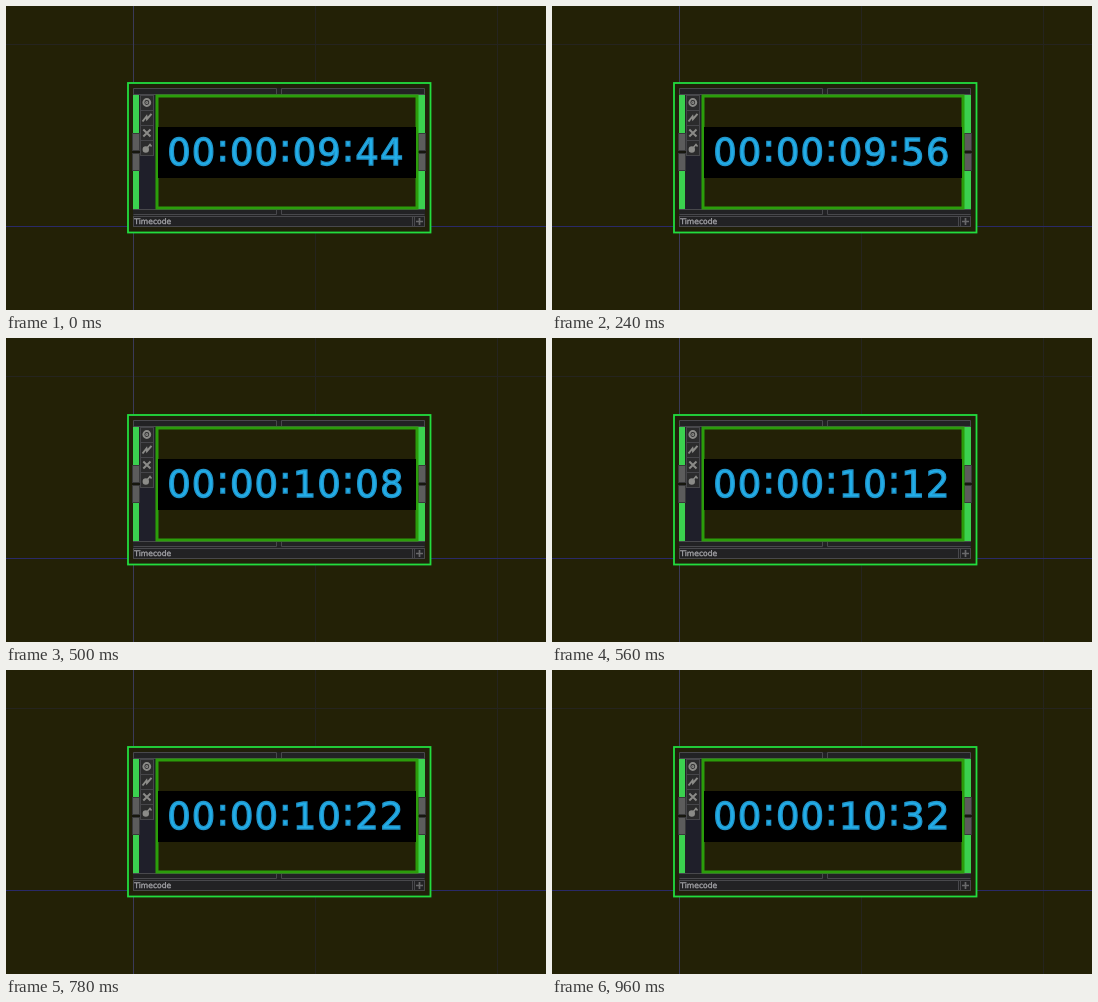
Recreate the animation shown at these times as an HTML page. Size 540 by 304 pixels, loop 980 ms.

```html
<!DOCTYPE html>
<html lang="en">
<head>
<meta charset="utf-8">
<title>Timecode</title>
<style>
  html, body { margin: 0; width: 100%; height: 100%; overflow: hidden; background: #232106; }
  svg { display: block; width: 540px; height: 304px; }
  text { font-family: "DejaVu Sans", sans-serif; }
  .digits { font-size: 37px; letter-spacing: 1.05px; fill: #22aee8; stroke: #2094ca; stroke-width: 1.3; }
  .label { font-size: 7.6px; fill: #a2a2a6; stroke: #a2a2a6; stroke-width: .35; }
  .edge { fill: none; stroke: #48484c; }
  .icon { fill: none; stroke: #8b8b88; stroke-width: 2; }
</style>
</head>
<body>
<svg viewBox="0 0 540 304">
  <rect width="540" height="304" fill="#232106"/>

  <!-- grid -->
  <path d="M0 38.5H540M309.5 0V304M491.5 0V304" stroke="#25241f" fill="none"/>
  <path d="M127.5 0V304" stroke="#3a3a58" fill="none"/>
  <path d="M0 220.5H540" stroke="#2a2a68" fill="none"/>

  <!-- node body -->
  <rect x="122" y="77" width="302.5" height="149.5" fill="#21200a" stroke="#22dc3e" stroke-width="1.8"/>
  <rect x="127" y="82" width="292" height="139" fill="#222224"/>
  <g class="edge">
    <path d="M127.5 88V82.5H270.5V88M275.5 88V82.5H418.5V88M127 88.5H419"/>
    <path d="M127 203.5H419M270.5 204V208.5H127.5M275.5 204V208.5H418.5"/>
    <rect x="127.5" y="210.5" width="291" height="10"/>
    <path d="M406.5 210V221M408.5 210V221"/>
  </g>

  <!-- side bars and connectors -->
  <path d="M127 89h6v114h-6zM412 89h7v114h-7z" fill="#3bd14f"/>
  <path d="M126 127h8v38h-8zM412 127h8v38h-8z" fill="#17170f"/>
  <g id="plugs" fill="#5c5c5c" stroke="#38383a"></g>

  <!-- flag column -->
  <rect x="134" y="89" width="15" height="114" fill="#1f1f2a"/>
  <g id="cells" fill="#2b2b2c" stroke="#46464a"></g>
  <g class="icon">
    <circle cx="140.8" cy="96.5" r="3.4"/>
    <circle cx="140.8" cy="96.5" r=".6"/>
    <path d="M136.5 115.5L140.5 110.5L141 113L145.5 107.8"/>
    <path d="M137.3 123.5L144.5 130.5M144.5 123.5L137.3 130.5"/>
    <circle cx="139.8" cy="143.5" r="2.2" fill="#8b8b88"/>
    <path d="M141 142L144 138.5L145.5 140.5" stroke-width="1.5"/>
  </g>

  <!-- viewer -->
  <rect x="151" y="90" width="260" height="112" fill="#232106" stroke="#2b9d0b" stroke-width="3"/>
  <rect x="152" y="121" width="258" height="51" fill="#000"/>
  <text class="digits" x="161.2" y="159.2"><tspan>00</tspan><tspan dy="-4">:</tspan><tspan dy="4">00</tspan><tspan dy="-4">:</tspan><tspan dy="4" id="sec">09</tspan><tspan dy="-4">:</tspan><tspan dy="4" id="frm">44</tspan></text>

  <!-- name bar -->
  <text class="label" x="128.3" y="218.3">Timecode</text>
  <path d="M410 215.5H417M413.5 212V219" stroke="#68686a" stroke-width="1.7" fill="none"/>
</svg>
<script>
  const LOOP = 980, STEP = 40, RATE = 60, START = 9 * RATE + 44;
  const byId = id => document.getElementById(id);
  const pad = n => String(n).padStart(2, "0");

  function addRect(parent, x, y, width, height) {
    const r = document.createElementNS("http://www.w3.org/2000/svg", "rect");
    Object.entries({ x, y, width, height }).forEach(([k, v]) => r.setAttribute(k, v));
    byId(parent).append(r);
  }
  for (const x of [126.5, 412.5])
    for (const y of [127.5, 147.5]) addRect("plugs", x, y, 7, 17);
  for (let i = 0; i < 4; i++) addRect("cells", 134.5, 89.5 + i * 15, 13, 15);

  const sec = byId("sec"), frm = byId("frm");

  // The counter runs two ticks per 40 ms and carries at 60.
  function draw(now) {
    const n = START + 2 * Math.floor((now % LOOP) / STEP);
    sec.textContent = pad(Math.floor(n / RATE));
    frm.textContent = pad(n % RATE);
  }
  const origin = performance.now();
  function tick() {
    draw(performance.now() - origin);
    requestAnimationFrame(tick);
  }
  tick();
</script>
</body>
</html>
```
